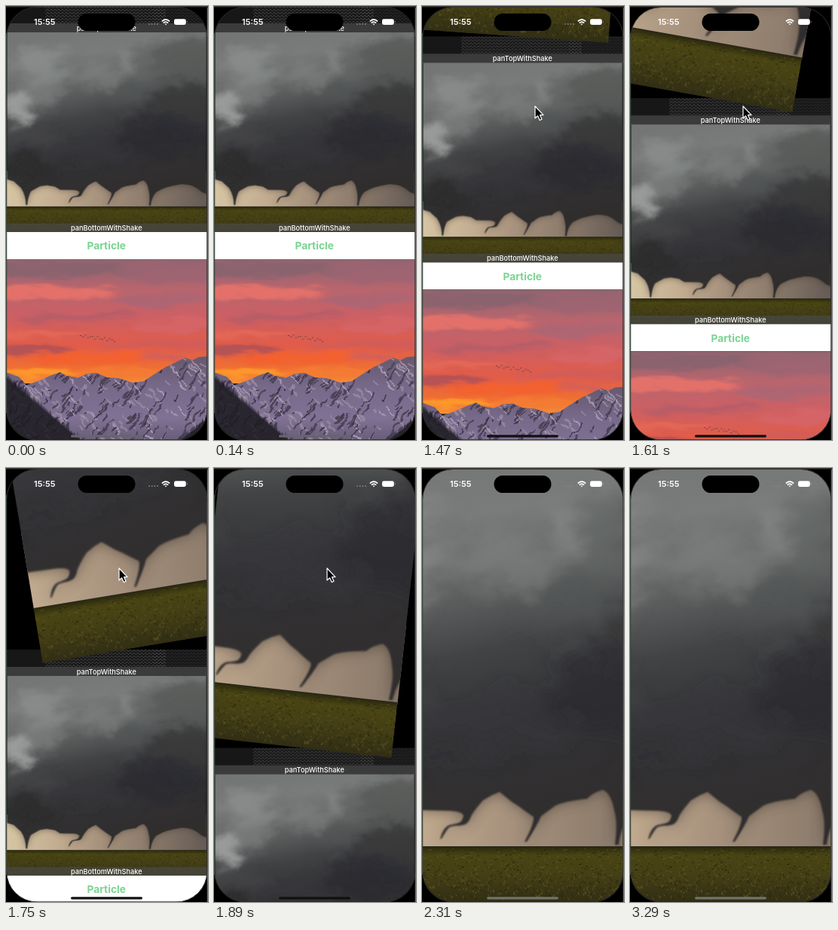
Animation of 268x576 px, one loop 3.36 s. Source, as an HTML page:

```html
<!DOCTYPE html>
<html lang="en">
<head>
<meta charset="utf-8">
<title>Page transition</title>
<style>
  html, body { margin: 0; width: 100%; height: 100%; overflow: hidden; background: #000; }
  svg { display: block; width: 100vw; height: 100vh; }
  text { font-family: Inter, Roboto, "Liberation Sans", sans-serif; text-anchor: middle; }
  .label { font-size: 9.2px; font-weight: 500; fill: #fff; }
</style>
</head>
<body>
<svg viewBox="0 0 268 576">
  <defs>
    <linearGradient id="storm" x2=".22" y2="1">
      <stop offset="0" stop-color="#737574"/>
      <stop offset=".2" stop-color="#7a7c7b"/>
      <stop offset=".4" stop-color="#5c5e5e"/>
      <stop offset=".54" stop-color="#424345"/>
      <stop offset=".72" stop-color="#333336"/>
      <stop offset="1" stop-color="#302d2d"/>
    </linearGradient>
    <linearGradient id="glow" x2="1" y2="0">
      <stop offset="0" stop-color="#d6c5a3"/>
      <stop offset=".25" stop-color="#c3ad91"/>
      <stop offset=".45" stop-color="#a8937e"/>
      <stop offset=".7" stop-color="#8d7c6c"/>
      <stop offset="1" stop-color="#655b55"/>
    </linearGradient>
    <linearGradient id="field" x2="0" y2="1">
      <stop offset="0" stop-color="#2b290f"/>
      <stop offset=".15" stop-color="#494413"/>
      <stop offset=".5" stop-color="#443f15"/>
      <stop offset="1" stop-color="#302d15"/>
    </linearGradient>
    <linearGradient id="dusk" x2="0" y2="1">
      <stop offset="0" stop-color="#8f6570"/>
      <stop offset=".25" stop-color="#b9656d"/>
      <stop offset=".45" stop-color="#cb6065"/>
      <stop offset=".7" stop-color="#e35c48"/>
      <stop offset=".9" stop-color="#f1722f"/>
      <stop offset="1" stop-color="#f38c3b"/>
    </linearGradient>
    <linearGradient id="snow" x2="0" y2="1">
      <stop offset="0" stop-color="#66586d"/>
      <stop offset=".3" stop-color="#77698a"/>
      <stop offset=".6" stop-color="#807294"/>
      <stop offset="1" stop-color="#544c64"/>
    </linearGradient>
    <pattern id="knit" width="5" height="4" patternUnits="userSpaceOnUse">
      <path d="M0 0L2.5 3L5 0" fill="none" stroke="#777" stroke-width=".9"/>
    </pattern>
    <filter id="billow" x="-20%" y="-20%" width="140%" height="140%">
      <feGaussianBlur stdDeviation="15" result="b"/>
      <feTurbulence type="fractalNoise" baseFrequency=".015 .022" numOctaves="4" seed="8" result="n"/>
      <feDisplacementMap in="b" in2="n" scale="75" xChannelSelector="R" yChannelSelector="G"/>
    </filter>
    <filter id="streak" x="-20%" y="-20%" width="140%" height="140%">
      <feGaussianBlur stdDeviation="5 2" result="b"/>
      <feTurbulence type="fractalNoise" baseFrequency=".018 .06" numOctaves="3" seed="5" result="n"/>
      <feDisplacementMap in="b" in2="n" scale="24" xChannelSelector="R" yChannelSelector="G"/>
    </filter>
    <filter id="rough" x="-20%" y="-20%" width="140%" height="140%">
      <feGaussianBlur stdDeviation=".6" result="b"/>
      <feTurbulence type="fractalNoise" baseFrequency=".09" numOctaves="2" seed="3" result="n"/>
      <feDisplacementMap in="b" in2="n" scale="9" xChannelSelector="R" yChannelSelector="G"/>
    </filter>
    <filter id="soft"><feGaussianBlur stdDeviation="1.1"/></filter>
    <filter id="haze"><feGaussianBlur stdDeviation="9"/></filter>
    <clipPath id="screen"><rect x="1" y="2" width="265.5" height="573.5" rx="40"/></clipPath>
    <clipPath id="stormFrame"><rect x="-154" width="576" height="576"/></clipPath>
    <clipPath id="fullFrame"><rect width="268" height="576"/></clipPath>
    <clipPath id="thumbFrame"><rect y="35" width="268" height="265"/></clipPath>
    <clipPath id="duskFrame"><rect y="336" width="268" height="265"/></clipPath>
    <path id="cloudShape" d="M-154 -30H422V467Q408 462 398 452Q380 438 350 438Q305 444 278 460Q264 474 261 500H256Q260 470 255 454
      Q251 432 240 427Q226 431 219 439Q190 442 177 448L158 462Q153 474 139 496H136Q149 472 148 463
      Q139 457 127 448L119 443L108 434L103 430L93 434L81 441Q66 458 64 465C58 480 43 471 35 478Q31 483 26 492H24
      Q28 477 36 474C49 471 53 472 55 461Q53 456 38 455L0 454L-15 445L-38 441L-58 444L-84 458Q-92 470 -95 498H-99
      Q-99 470 -113 449L-134 430L-154 424Z"/>
    <mask id="cloud" maskUnits="userSpaceOnUse" x="-154" y="0" width="576" height="576">
      <use href="#cloudShape" fill="#fff" filter="url(#soft)"/>
    </mask>
    <path id="ridge" d="M0 486L8 489L17 492L27 503L45 497L60 490L72 486L80 491L96 493L108 488L120 487L134 493L150 494L168 500
      L183 498L196 489L212 479L225 473L237 467L248 470L256 466L268 465V601H0Z"/>
    <clipPath id="slopes"><use href="#ridge"/></clipPath>

    <g id="tornado" clip-path="url(#stormFrame)">
      <rect x="-154" y="400" width="576" height="105" fill="url(#glow)"/>
      <use href="#cloudShape" fill="#3d342e" filter="url(#haze)" opacity=".6"/>
      <g mask="url(#cloud)">
        <rect x="-154" width="576" height="510" fill="url(#storm)"/>
        <g id="puffs" filter="url(#billow)"></g>
      </g>
      <rect x="-154" y="503" width="576" height="74" fill="url(#field)"/>
      <g id="grass" fill="none"></g>
      <rect x="-154" y="502" width="576" height="2" fill="#292817"/>
    </g>
  </defs>

  <rect width="268" height="576" fill="#000"/>
  <g clip-path="url(#screen)">
    <rect width="268" height="576" fill="#000"/>
    <g id="listPage">
      <rect width="268" height="36" fill="#171718"/>
      <rect x="52" width="160" height="24" fill="url(#knit)" opacity=".5"/>
      <rect x="195" width="73" height="24" fill="url(#knit)" opacity=".22"/>
      <rect y="23" width="268" height="12.5" fill="#3b3b3c"/>
      <text class="label" x="133.3" y="32.6">panTopWithShake</text>

      <g clip-path="url(#thumbFrame)">
        <use href="#tornado" transform="translate(71.86 35) scale(.46)"/>
      </g>
      <rect y="288.5" width="268" height="11.5" fill="#4a4a43" opacity=".75"/>
      <text class="label" x="133.3" y="297.6">panBottomWithShake</text>

      <rect y="300" width="268" height="36" fill="#fff"/>
      <text x="133.2" y="323.3" font-size="13.8" font-weight="700" fill="#7bd492">Particle</text>

      <g clip-path="url(#duskFrame)">
        <rect y="336" width="268" height="165" fill="url(#dusk)"/>
        <g id="bands" filter="url(#streak)"></g>
        <path id="birds" fill="none" stroke="#593b46" stroke-width=".8"/>
        <use href="#ridge" fill="url(#snow)"/>
        <g clip-path="url(#slopes)">
          <g id="rocks" fill="none" filter="url(#rough)"></g>
          <path id="woods" fill="#1c1a20" opacity=".86"/>
        </g>
      </g>
    </g>

    <g id="stormPage">
      <g clip-path="url(#fullFrame)"><use href="#tornado"/></g>
    </g>

    <rect x="95.5" y="10" width="76" height="23" rx="11.5" fill="#000"/>
    <rect id="homeBar" x="86" y="569.2" width="95" height="3.2" rx="1.6"/>
  </g>

  <path d="M.5 36V540" stroke="#3d5843"/>
  <path d="M267.3 2V576" stroke="#858585"/>
  <path d="M0 .7H268" stroke="#3b3834" stroke-width="1.4"/>
  <rect x=".8" y="1.5" width="266" height="574.5" rx="40" fill="none" stroke="#3c3c3c" stroke-width=".8"/>

  <text x="51.2" y="25.4" font-size="11" font-weight="600" fill="#fff">15:55</text>
  <path d="M190 24H203" stroke="#858585" stroke-width="1.8" stroke-linecap="round" stroke-dasharray="0 3.7"/>
  <g fill="none" stroke="#fff" stroke-width="1.7">
    <path d="M206.8 20.3Q212 15.7 217.2 20.3M208.8 22.5Q212 19.7 215.2 22.5"/>
    <path d="M210.6 23.8Q212 22.8 213.4 23.8L212 25.2Z" fill="#fff" stroke="none"/>
  </g>
  <rect x="223" y="17.2" width="15.8" height="7.8" rx="2.4" fill="#fff"/>
  <path d="M240 19.6Q241.4 21.1 240 22.6Z" fill="#bbb"/>

  <path id="cursor" d="M150 133V149L153.6 145.8L156.2 151.6L159 150.3L156.5 144.7H161Z"
    fill="#000" stroke="#fff" stroke-width="1.2" stroke-linejoin="round"/>
</svg>
<script>
const LOOP = 3360, STEP = 70, START = 1275, SLIDE = 1050, HEIGHT = 576, SHAKE = 11.5;
const byId = id => document.getElementById(id);

function seeded(seed) {
  return () => (seed = (seed * 16807) % 2147483647) / 2147483647;
}

function add(parent, tag, attrs) {
  const node = document.createElementNS('http://www.w3.org/2000/svg', tag);
  for (const name in attrs) node.setAttribute(name, attrs[name]);
  byId(parent).append(node);
}

function blobs(parent, list) {
  for (const [cx, cy, rx, ry, fill, opacity] of list)
    add(parent, 'ellipse', { cx, cy, rx, ry, fill, opacity });
}

function strokes(parent, count, stroke, width, segment) {
  let d = '';
  for (let i = 0; i < count; i++) d += segment();
  add(parent, 'path', { d, stroke, 'stroke-width': width });
}

function paintStorm() {
  blobs('puffs', [
    [-40, 95, 85, 55, '#939594', .6],
    [-125, 215, 38, 50, '#aaadac', .8],
    [-60, 180, 75, 35, '#868887', .6],
    [20, 90, 40, 16, '#5e6060', .6],
    [110, 125, 65, 40, '#828483', .6],
    [188, 88, 20, 24, '#8f9291', .7],
    [250, 75, 45, 50, '#656766', .6],
    [360, 70, 90, 70, '#565857', .8],
    [210, 180, 80, 35, '#535555', .6],
    [360, 220, 120, 70, '#37373a', .8],
    [290, 300, 130, 60, '#2b2b31', .7],
    [-80, 305, 90, 25, '#48494a', .6],
    [80, 340, 130, 30, '#3a3a3d', .5],
    [-90, 390, 80, 40, '#2d2d2e', .8]
  ]);
  const rnd = seeded(71);
  const blade = () => {
    const depth = rnd(), x = -154 + rnd() * 576, y = 506 + depth * 68;
    return `M${x.toFixed(1)} ${y.toFixed(1)}l${(4 - rnd() * 8).toFixed(1)} ${(-.5 - depth * 3).toFixed(1)}`;
  };
  strokes('grass', 700, '#645a22', .8, blade);
  strokes('grass', 700, '#27260d', 1, blade);
}

function paintDusk() {
  blobs('bands', [
    [60, 350, 120, 9, '#86636f', .8],
    [230, 352, 80, 14, '#9d6572', .8],
    [55, 381, 90, 8, '#e8736b', .9],
    [205, 390, 65, 9, '#ab6675', .8],
    [90, 412, 80, 6, '#b05c68', .7],
    [225, 425, 60, 9, '#d6676a', .8],
    [40, 434, 70, 5, '#e76a57', .8],
    [35, 456, 55, 7, '#a95059', .8],
    [205, 450, 80, 7, '#d05d5a', .8],
    [115, 467, 85, 6, '#f4602c', .9],
    [230, 466, 50, 5, '#d1605d', .8],
    [45, 487, 55, 6, '#ff9c29', .9],
    [150, 485, 60, 5, '#f57e34', .8]
  ]);
  let d = '';
  for (let i = 0; i < 15; i++)
    d += `M${98 + i * 3.2} ${437 + i * .45 + 2 * Math.sin(i * 2.4)}l1 .8l1.2 -.7`;
  byId('birds').setAttribute('d', d);

  const rnd = seeded(29);
  const crag = (dx, dy) => () => {
    const x = rnd() * 268, y = 466 + rnd() * 120, size = .4 + rnd();
    return `M${x.toFixed(1)} ${y.toFixed(1)}l${(dx * size).toFixed(1)} ${(dy * size).toFixed(1)}`;
  };
  strokes('rocks', 110, '#94869f', 2.5, crag(10, 9));
  strokes('rocks', 130, '#4c4258', 2.5, crag(-9, 12));
  strokes('rocks', 60, '#aa9cb3', 1.6, crag(8, 9));
  strokes('rocks', 90, '#3a3344', 1.4, crag(-6, 7));

  const slope = x => x < 130 ? 494 + x * .85 : 601 - Math.max(0, x - 205) * .85;
  d = 'M0 601';
  for (let x = 0; x <= 268; x += 2)
    d += `L${x} ${slope(x).toFixed(1)}L${x + 1} ${(slope(x) - 2 - rnd() * 8).toFixed(1)}`;
  byId('woods').setAttribute('d', d + 'V601Z');
}

// cubic-bezier(.42, 0, .58, 1)
function easeInOut(x) {
  if (x <= 0 || x >= 1) return x <= 0 ? 0 : 1;
  let lo = 0, hi = 1;
  for (let i = 0; i < 24; i++) {
    const s = (lo + hi) / 2, r = 1 - s;
    if (3 * r * r * s * .42 + 3 * r * s * s * .58 + s ** 3 < x) lo = s; else hi = s;
  }
  return lo * lo * (3 - 2 * lo);
}

function shakeAngle(p) {
  const keys = [0, 1, -1, 1, -1, 0], at = p * 5, i = Math.min(4, Math.floor(at));
  return SHAKE * (keys[i] + (keys[i + 1] - keys[i]) * (at - i));
}

function render(t) {
  const p = t >= 2310 ? 1 : easeInOut((t - START) / SLIDE);
  const y = HEIGHT * p;
  byId('listPage').setAttribute('transform', `translate(0 ${y})`);
  byId('listPage').style.display = p < 1 ? '' : 'none';
  byId('stormPage').setAttribute('transform', `translate(0 ${y - HEIGHT}) rotate(${shakeAngle(p)} 134 288)`);
  byId('stormPage').style.display = p > 0 ? '' : 'none';
  byId('homeBar').setAttribute('fill', p === 0 ? '#68666c' : p < 1 ? '#111' : '#72736a');
  byId('cursor').style.display = t >= 1190 && t < 2310 ? '' : 'none';
}

paintStorm();
paintDusk();
let begin, shown = -1;
function tick(now) {
  begin ??= now;
  const t = Math.floor(((now - begin) % LOOP) / STEP) * STEP;
  if (t !== shown) render(shown = t);
  requestAnimationFrame(tick);
}
render(0);
requestAnimationFrame(tick);
</script>
</body>
</html>
```
